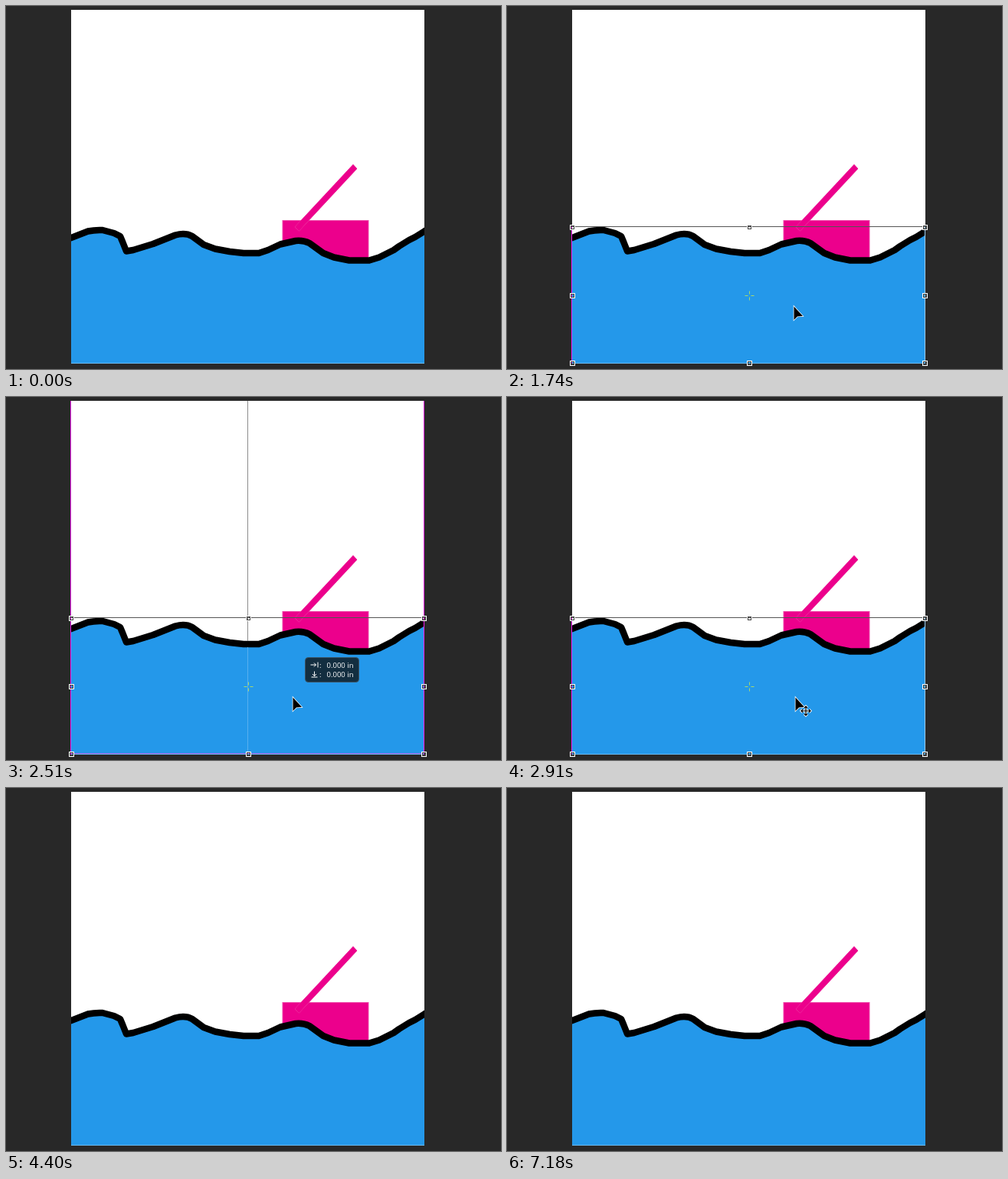
An HTML page with a canvas for the animation above (8000 ms loop, 646x473 px).

```html
<!DOCTYPE html>
<html lang="en">
<head>
<meta charset="utf-8">
<title>Moving a wave layer</title>
<style>
html, body { margin: 0; width: 100%; height: 100%; overflow: hidden; background: #282828; }
canvas { display: block; }
</style>
</head>
<body>
<canvas id="stage" width="646" height="473"></canvas>
<script>
const ctx = document.getElementById('stage').getContext('2d');
const LOOP = 8000;
const L = 85, T = 5, R = 546, B = 466, MID = 315;
const PINK = '#ec008c', BLUE = '#2498ea', MAGENTA = '#f01ef0';

const wave = new Path2D('M78 305L85 302L107 293.5Q116 291.5 126 292L141 296L149 300L152 307L157 319.5' +
  'L166 318L192 310L221 298.5Q234 295 243 300L258 311L273 316.5L292 320L310 322L330 322L342 318' +
  'L358 310.5L378 306Q388 305 396 309L414 322L428 327.5L448 331.5L474 331.5L487 327.5' +
  'L506 318L513 313L526 305L534 301L546 293.5L554 289');
const water = new Path2D(wave);
water.lineTo(554, B);
water.lineTo(78, B);

const arrow = new Path2D('M.5 .5V18L5 13.5L12 13Z');
const pointer = new Path2D('M.5 .5V16.5L4 13L6.5 18.5L9 17.5L6.5 12H11.5Z');
const fourWay = new Path2D('M8 18H20M14 12V24M10 16L8 18L10 20M18 16L20 18L18 20' +
  'M12 14L14 12L16 14M12 22L14 24L16 22');

// Time, x, y of each pointer position
const track = [
  [500, 597, 353], [580, 520, 366], [650, 440, 376], [730, 393, 380],
  [900, 388, 384], [1050, 384, 385], [1280, 374, 386], [1510, 374, 388],
  [1590, 374, 390], [1740, 374, 391], [1970, 372, 386], [2280, 373, 389],
  [2360, 374, 391], [2910, 376, 391], [2990, 380, 390], [3060, 384, 388],
  [3210, 389, 386], [3610, 390, 386], [4080, 420, 374], [4155, 515, 420], [4230, 612, 471]
];

function line(x1, y1, x2, y2, color, width = 1) {
  ctx.strokeStyle = color;
  ctx.lineWidth = width;
  ctx.beginPath();
  ctx.moveTo(x1, y1);
  ctx.lineTo(x2, y2);
  ctx.stroke();
}

function outlined(path, fill, stroke, width) {
  ctx.lineWidth = width;
  ctx.strokeStyle = stroke;
  ctx.stroke(path);
  ctx.fillStyle = fill;
  ctx.fill(path);
}

function drawArt(dy) {
  ctx.save();
  ctx.beginPath();
  ctx.rect(L, T, R - L, B - T);
  ctx.clip();
  ctx.fillStyle = '#fff';
  ctx.fillRect(L, T, R - L, B - T);

  ctx.fillStyle = PINK;
  ctx.fillRect(361, 279.5, 112, 54);
  ctx.lineWidth = 1;
  ctx.strokeStyle = '#f04aab';
  ctx.strokeRect(361, 279.5, 112, 54);
  outlined(new Path2D('M453 206.5L458 212L382.5 293L377 288Z'), PINK, '#f04aab', 1);

  ctx.translate(0, dy);
  ctx.fillStyle = BLUE;
  ctx.fill(water);
  if (dy > 0) ctx.fillRect(L, B - dy, R - L, dy);
  ctx.lineJoin = ctx.lineCap = 'round';
  ctx.lineWidth = 8.5;
  ctx.strokeStyle = '#000';
  ctx.stroke(wave);
  ctx.restore();
  const edge = Math.min(B, B + dy) - .5;
  line(L, edge, R, edge, '#6bb8ee');
}

function drawBounds(dy, snapped) {
  const top = 287.5 + dy, bottom = 465.5 + dy;
  line(L, top, R, top, snapped ? '#a010a0' : '#555');
  line(84.5, top, 84.5, bottom, MAGENTA);
  line(545.5, top, 545.5, bottom, '#9ccff5');
}

function drawGuides(dy) {
  line(84.5, T, 84.5, B, MAGENTA);
  line(545.5, T, 545.5, B, MAGENTA);
  line(MID + .5, T, MID + .5, 318 + dy, '#8c8c8c');
  line(MID + .5, 326 + dy, MID + .5, B + dy, '#58b0ef');
  if (dy) line(L, 279, R, 279, '#b000b0', 2);
  else line(L, 464.5, R, 464.5, '#a060e8');
}

function drawHandles(dy) {
  const ys = [288, 377, 465].map(y => y + dy);
  for (const y of ys) for (const x of [85, 316, 545]) {
    if (x === 316 && y === ys[1]) continue;
    ctx.lineWidth = 1;
    ctx.strokeStyle = '#fff';
    ctx.strokeRect(x - 2.5, y - 2.5, 6, 6);
    ctx.strokeStyle = '#444';
    ctx.strokeRect(x - 1.5, y - 1.5, 4, 4);
  }
  const x = 316.5, y = ys[1] + .5, c = '#a9d86c';
  for (const s of [-1, 1]) {
    line(x + s * 2, y, x + s * 6, y, c);
    line(x, y + s * 2, x, y + s * 6, c);
  }
}

function drawTip(x, y, amount, up) {
  ctx.fillStyle = 'rgba(18,38,52,.93)';
  ctx.beginPath();
  ctx.roundRect(x, y, 70, 32, 4);
  ctx.fill();
  ctx.lineWidth = 1;
  ctx.strokeStyle = '#3b5364';
  ctx.stroke();

  ctx.save();
  ctx.translate(x, y);
  ctx.lineWidth = 1;
  ctx.strokeStyle = '#fff';
  ctx.stroke(new Path2D('M7 9.5H14M11.5 7L14 9.5L11.5 12M16.5 6V13'));
  ctx.stroke(new Path2D(up
    ? 'M8 18.5H16M12 26V20M9.5 22.5L12 20L14.5 22.5'
    : 'M8 25.5H16M12 18V24M9.5 21.5L12 24L14.5 21.5'));
  ctx.fillStyle = '#fff';
  ctx.font = '9.5px "Open Sans", sans-serif';
  ['0.000 in', amount + ' in'].forEach((s, i) => {
    ctx.fillText(':', 18.5, 13 + i * 12);
    ctx.fillText(s, 28, 13 + i * 12);
  });
  ctx.restore();
}

function drawCursor(t) {
  const at = track.findLast(p => p[0] <= t);
  if (!at || t >= 4400) return;
  ctx.save();
  ctx.translate(at[1], at[2]);
  ctx.lineJoin = 'miter';
  if (t >= 3610) {
    outlined(pointer, '#fff', '#000', 2);
  } else {
    outlined(arrow, '#000', '#fff', 1.5);
    if (t < 1590 || t >= 2910) {
      ctx.lineWidth = 3;
      ctx.strokeStyle = '#fff';
      ctx.stroke(fourWay);
      ctx.lineWidth = 1.2;
      ctx.strokeStyle = '#000';
      ctx.stroke(fourWay);
    }
  }
  ctx.restore();
}

function draw(t) {
  const between = (a, b) => t >= a && t < b;
  const dragging = between(1970, 2910);
  const lifted = between(1970, 2510);
  const dy = lifted ? -8 : t >= 3680 ? 1 : 0;

  ctx.fillStyle = '#282828';
  ctx.fillRect(0, 0, 646, 473);
  drawArt(t < 500 ? 0 : dy);
  if (between(900, 3610)) drawBounds(dy, lifted);
  if (dragging) drawGuides(dy);
  if (between(1280, 3610)) drawHandles(dy);
  if (dragging) {
    const early = t < 2280;
    drawTip(early ? 388.5 : 390.5, early ? 342.5 : 339.5, lifted ? '0.090' : '0.000', lifted);
  }
  drawCursor(t);
}

function frame() {
  draw(performance.now() % LOOP);
  requestAnimationFrame(frame);
}
frame();
</script>
</body>
</html>
```
